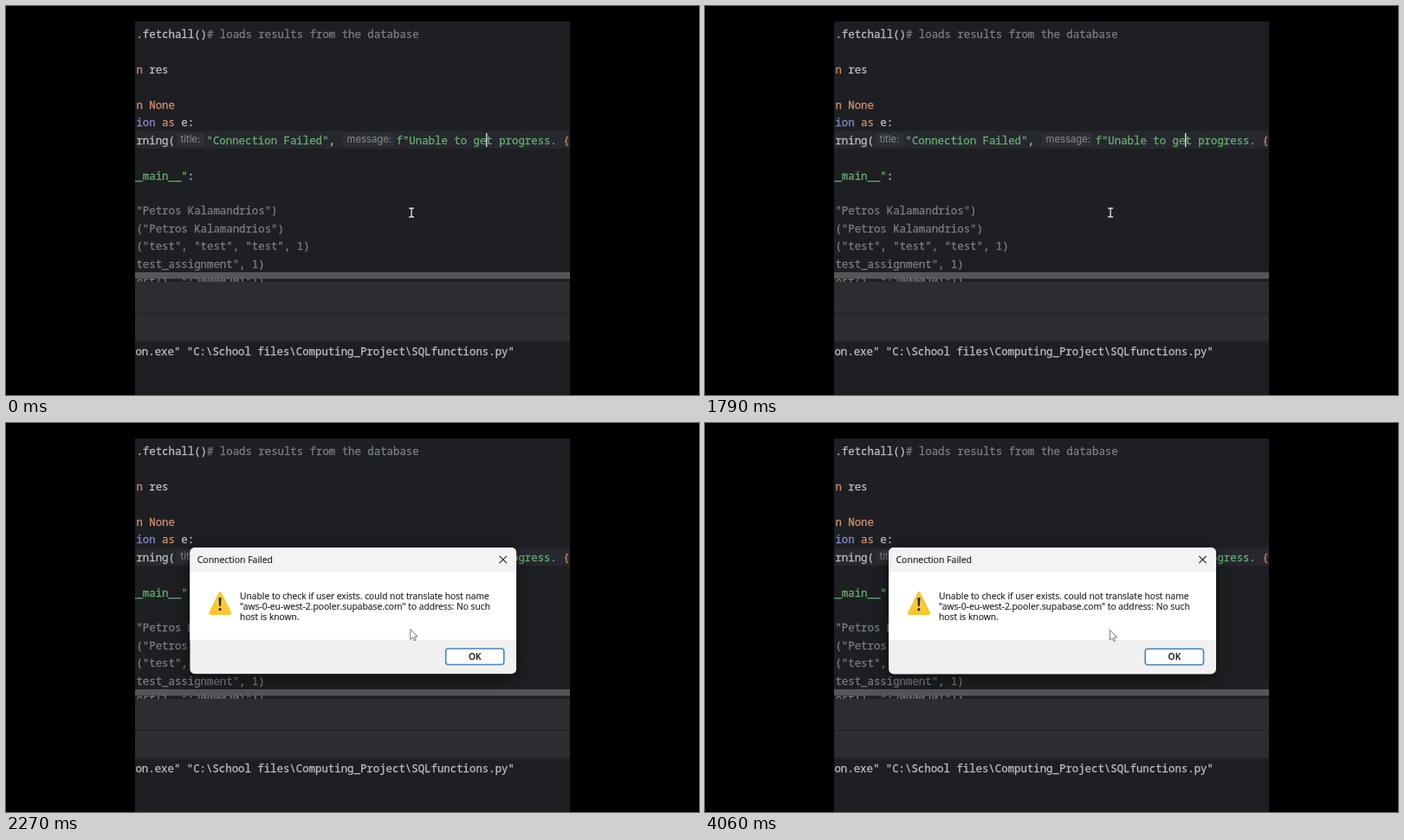
Animation of 800 by 450 pixels, one loop 4.09 s. Source, as an HTML page:

```html
<!DOCTYPE html>
<html lang="en">
<head>
<meta charset="utf-8">
<title>Connection Failed</title>
<style>
  html, body { margin: 0; width: 100%; height: 100%; overflow: hidden; background: #000; }
  svg { display: block; width: 800px; height: 450px; }
  text { white-space: pre; }
  .code { font: 12.37px "Noto Sans Mono", monospace; color: #bcbec4; }
  .code, .code tspan { fill: currentColor; stroke: currentColor; stroke-width: .3px; }
  .hint { font: 11.3px Inter, sans-serif; fill: #868a91; }
  .dlg { font: 10.3px "Open Sans", sans-serif; fill: #1c1c1c; stroke: #1c1c1c; stroke-width: .15px; }
  .key { color: #cf8e6d; }
  .str { color: #6aab73; }
  .off { color: #7a7e85; }
  .cls { color: #8888c6; }
  #dialog { filter: drop-shadow(0 5px 10px rgba(0, 0, 0, .55)); }
</style>
</head>
<body>
<svg viewBox="0 0 800 450">
  <defs>
    <clipPath id="screen"><rect x="149" y="18" width="502" height="432"/></clipPath>
    <clipPath id="editor"><rect x="149" y="18" width="502" height="301"/></clipPath>
    <clipPath id="frame"><rect x="212" y="144" width="378" height="146.500" rx="6"/></clipPath>
    <linearGradient id="amber" x2="0" y2="1">
      <stop stop-color="#ffdc50"/><stop offset="1" stop-color="#fbc324"/>
    </linearGradient>
  </defs>
  <rect width="800" height="450"/>
  <g clip-path="url(#screen)">
    <rect x="149" y="18" width="502" height="432" fill="#1e1f22"/>
    <rect x="149" y="144.500" width="502" height="20.500" fill="#26282e"/>
    <g fill="#2d2f33">
      <rect x="197" y="146.500" width="32" height="16" rx="3"/>
      <rect x="389" y="146.500" width="59" height="16" rx="3"/>
    </g>
    <g id="lines" clip-path="url(#editor)"></g>
    <text class="hint" x="201.500" y="158">title:</text>
    <text class="hint" x="393.500" y="158">message:</text>
    <rect id="caret" x="554" y="147" width="1.500" height="16" fill="#ced0d6"/>
    <rect x="149" y="308" width="502" height="7.500" fill="#5b5c5e" opacity=".92"/>
    <rect x="149" y="319" width="502" height="68.500" fill="#2b2d30"/>
    <rect x="149" y="355" width="502" height="1" fill="#1e1f22"/>
    <text class="code" x="149.400" y="403.500">on.exe" "C:\School files\Computing_Project\SQLfunctions.py"</text>

    <g id="dialog">
      <g clip-path="url(#frame)">
        <rect x="212" y="144" width="378" height="147" fill="#f0f0f0"/>
        <rect x="212" y="144" width="378" height="28" fill="#f3f3f3"/>
        <rect x="212" y="172" width="378" height="79" fill="#fff"/>
      </g>
      <text class="dlg" x="220.500" y="161.700" style="font-size:10.5px">Connection Failed</text>
      <path d="M570.300 153.800l8.400 8.400m0-8.400l-8.400 8.400" stroke="#222" stroke-width="1.100"/>
      <path d="M247 196.500L258.500 219.800Q258.700 220.500 257.700 220.500H236.300Q235.300 220.500 235.600 219.800Z"
            fill="url(#amber)" stroke="#f9c52e" stroke-width="3" stroke-linejoin="round"/>
      <path d="M245.300 202h3.200l-.6 10h-2z" fill="#2b2b2b"/>
      <circle cx="246.900" cy="215.700" r="1.600" fill="#2b2b2b"/>
      <g class="dlg">
        <text x="270" y="204">Unable to check if user exists. could not translate host name</text>
        <text x="270" y="216">"aws-0-eu-west-2.pooler.supabase.com" to address: No such</text>
        <text x="270" y="228">host is known.</text>
      </g>
      <rect x="508.200" y="261.200" width="67.300" height="18.600" rx="3" fill="#fdfdfd" stroke="#4a86bd" stroke-width="1.600"/>
      <text class="dlg" x="541.900" y="274.300" text-anchor="middle" style="font-weight:600">OK</text>
    </g>

    <path id="beam" d="M465.300 234h2l.8.700.8-.7h2M468.100 234.500v9M465.300 244h2l.8-.7.800.7h2"
          fill="none" stroke="#e8e8e8" stroke-width="1.300"/>
    <path id="arrow" d="M0 0V11.800L2.700 9.300L4.500 13.200L6.300 12.400L4.600 8.600H8.300Z"
          fill="#fff" stroke="#555" stroke-width=".8" stroke-linejoin="round"/>
  </g>
</svg>
<script>
const LOOP = 4090, OPEN = 2045;
const LEFT = 150.4, TOP = 37.4, ROW = 20.4;
const $ = id => document.getElementById(id);

// Each run: row, x, then pairs of class and text.
const runs = [
  [0, LEFT, '', '.fetchall()', 'off', '# loads results from the database'],
  [2, LEFT, 'key', 'n ', '', 'res'],
  [4, LEFT, 'key', 'n None'],
  [5, LEFT, 'cls', 'ion ', 'key', 'as ', '', 'e:'],
  [6, LEFT, '', 'rning('],
  [6, 231.5, 'str', '"Connection Failed"', '', ','],
  [6, 450.5, 'str', 'f"Unable to get progress. ', 'key', '{'],
  [8, LEFT - 7.42, 'str', '__main__"', '', ':'],
  [10, LEFT, 'off', '"Petros Kalamandrios")'],
  [11, LEFT, 'off', '("Petros Kalamandrios")'],
  [12, LEFT, 'off', '("test", "test", "test", 1)'],
  [13, LEFT, 'off', 'test_assignment", 1)'],
  [14, LEFT, 'off', 'est(1, ":20000201"))']
];

function add(parent, tag, attrs) {
  const node = document.createElementNS('http://www.w3.org/2000/svg', tag);
  for (const key in attrs) node.setAttribute(key, attrs[key]);
  return parent.appendChild(node);
}

for (const [row, x, ...parts] of runs) {
  const line = add($('lines'), 'text', { class: 'code', x, y: TOP + row * ROW });
  for (let i = 0; i < parts.length; i += 2)
    add(line, 'tspan', { class: parts[i] }).textContent = parts[i + 1];
}

const show = (id, on) => $(id).setAttribute('visibility', on ? 'visible' : 'hidden');

function draw(now) {
  const t = now % LOOP, open = t >= OPEN;
  // The caret blinks until the dialog takes the focus.
  show('caret', !open && (t + 270) % 1000 < 500);
  show('beam', !open);
  show('arrow', open);
  show('dialog', open);
  if (open) {
    // The window grows from a point left of and above its centre.
    const scale = 1 - 0.077 * Math.exp((2090 - t) / 53);
    $('dialog').setAttribute('transform', `translate(303 175) scale(${scale}) translate(-303 -175)`);
    $('dialog').setAttribute('opacity', Math.min(1, (t - OPEN) / 82));
    $('arrow').setAttribute('transform', t < 3300 ? 'translate(466.8 238.6)' : 'translate(467.4 239.4)');
  }
}

const start = performance.now();
function tick() {
  draw(performance.now() - start);
  requestAnimationFrame(tick);
}
tick();
</script>
</body>
</html>
```
